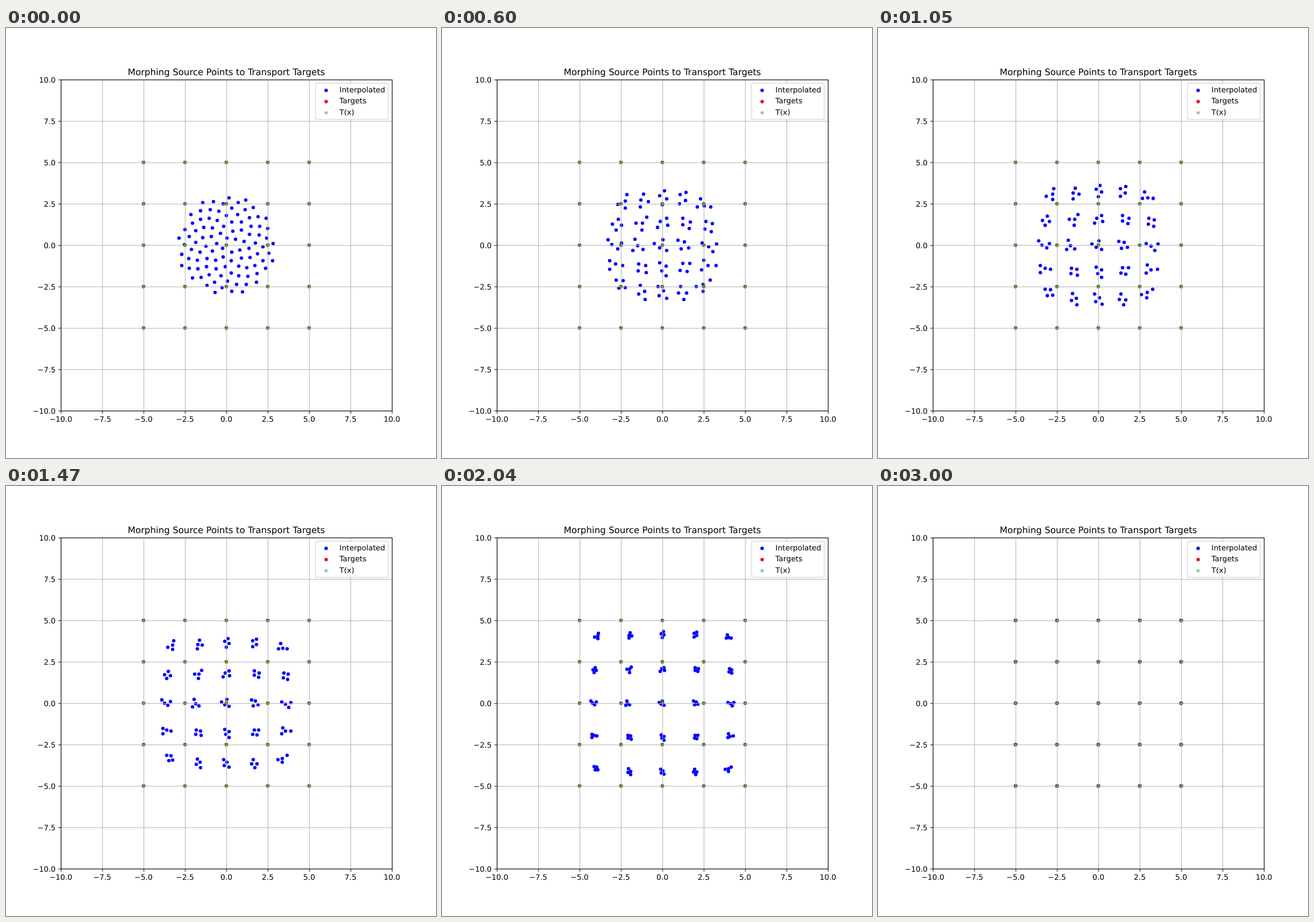
Recreate the animation shown at these times as an HTML page. Size 748 by 748 pixels, loop 3030 ms.

```html
<!DOCTYPE html>
<html lang="en">
<head>
<meta charset="utf-8">
<title>Morphing Source Points to Transport Targets</title>
<style>
  html, body { margin: 0; width: 100%; height: 100%; overflow: hidden; background: #fff; }
  svg { display: block; width: 100vw; height: 100vh; }
  text { font: 13.889px "DejaVu Sans", Verdana, sans-serif; fill: #000; text-rendering: geometricPrecision; }
  .title { font-size: 16.667px; }
  .dot { stroke-width: 2.083; }
  .grid { stroke: #b0b0b0; stroke-width: 1.11; }
  .axis { stroke: #000; stroke-width: 1.11; fill: none; }
  .mid { text-anchor: middle; }
  .end { text-anchor: end; }
</style>
</head>
<body>
<svg id="stage" viewBox="0 0 800 800"></svg>
<script>
const FRAME_MS = 30, STEPS = 100, COUNT = 100, PER_TARGET = 4;
const LEFT = 102, TOP = 96, SIZE = 616, UNIT = SIZE / 20, CELL = SIZE / 8;
const stage = document.getElementById('stage');

function add(parent, tag, attrs, content) {
  const el = document.createElementNS('http://www.w3.org/2000/svg', tag);
  for (const key in attrs) el.setAttribute(key, attrs[key]);
  if (content) el.textContent = content;
  return parent.appendChild(el);
}
const group = () => add(stage, 'g', {});
const label = (x, y, content, cls = '') => add(stage, 'text', { x, y, class: cls }, content);
const line = (parent, x1, y1, x2, y2, cls) => add(parent, 'line', { x1, y1, x2, y2, class: cls });
const dot = (parent, color, opacity = 1) => add(parent, 'circle', {
  class: 'dot', r: 2.196, fill: color, stroke: color,
  'fill-opacity': opacity, 'stroke-opacity': opacity
});

// Markers sit on whole plot units, like a raster plotter places them.
function place(el, x, y) {
  el.setAttribute('cx', Math.floor(LEFT + (x + 10) * UNIT + 0.5));
  el.setAttribute('cy', Math.floor(TOP + (10 - y) * UNIT + 0.5));
}

// Sunflower spiral filling a disk of radius 3.
const sources = Array.from({ length: COUNT }, (_, k) => {
  const radius = 3 * Math.sqrt((k + 1) / COUNT);
  const angle = (k + 1) * Math.PI * (1 + Math.sqrt(5));
  return [radius * Math.cos(angle), radius * Math.sin(angle)];
});
const targets = Array.from({ length: 25 }, (_, k) => [(k % 5 - 2) * 2.5, (2 - Math.floor(k / 5)) * 2.5]);
const slots = Array.from({ length: COUNT }, (_, k) => targets[Math.floor(k / PER_TARGET)]);

// Hungarian method: the cheapest one-to-one matching, as column per row.
function assign(n, cost) {
  const u = new Float64Array(n + 1), v = new Float64Array(n + 1);
  const rowOf = new Int32Array(n + 1), way = new Int32Array(n + 1);
  for (let i = 1; i <= n; i++) {
    const best = new Float64Array(n + 1).fill(Infinity), used = new Uint8Array(n + 1);
    let col = 0;
    rowOf[0] = i;
    do {
      used[col] = 1;
      const row = rowOf[col];
      let delta = Infinity, next = 0;
      for (let j = 1; j <= n; j++) {
        if (used[j]) continue;
        const slack = cost(row - 1, j - 1) - u[row] - v[j];
        if (slack < best[j]) { best[j] = slack; way[j] = col; }
        if (best[j] < delta) { delta = best[j]; next = j; }
      }
      for (let j = 0; j <= n; j++) {
        if (used[j]) { u[rowOf[j]] += delta; v[j] -= delta; }
        else best[j] -= delta;
      }
      col = next;
    } while (rowOf[col]);
    while (col) {
      rowOf[col] = rowOf[way[col]];
      col = way[col];
    }
  }
  const result = [];
  for (let j = 1; j <= n; j++) result[rowOf[j] - 1] = j - 1;
  return result;
}
const distance2 = (a, b) => (a[0] - b[0]) ** 2 + (a[1] - b[1]) ** 2;
const goals = assign(COUNT, (i, j) => distance2(sources[i], slots[j])).map(j => slots[j]);

// Points
const moving = group(), fixed = group();
const dots = sources.map(() => dot(moving, '#00f'));
for (const [x, y] of targets) place(dot(fixed, '#f00'), x, y);
for (const [x, y] of slots) place(dot(fixed, '#008000', 0.3), x, y);

// Grid, ticks and frame
const grid = group(), axes = group();
const start = LEFT + 0.5, top0 = TOP + 0.5, right = start + SIZE, bottom = top0 + SIZE;
for (let k = 0; k <= 8; k++) {
  const x = start + k * CELL, y = top0 + k * CELL;
  const name = value => value.toFixed(1).replace('-', '\u2212');
  line(grid, x, top0, x, bottom, 'grid');
  line(grid, start, y, right, y, 'grid');
  line(axes, x, bottom, x, bottom + 4.86, 'axis');
  line(axes, start - 4.86, y, start, y, 'axis');
  label(x - 0.5, 732.5, name(k * 2.5 - 10), 'mid');
  label(92.3, y + 4.8, name(10 - k * 2.5), 'end');
}
add(axes, 'rect', { x: start, y: top0, width: SIZE, height: SIZE, class: 'axis' });
label(410, 87.7, 'Morphing Source Points to Transport Targets', 'title mid');

// Legend
add(stage, 'rect', {
  x: 576, y: 103, width: 135, height: 67, rx: 2.78,
  fill: '#fff', 'fill-opacity': 0.8, stroke: '#ccc', 'stroke-opacity': 0.8, 'stroke-width': 1.39
});
[['Interpolated', '#00f', 1], ['Targets', '#f00', 1], ['T(x)', '#008000', 0.3]].forEach(([name, color, opacity], k) => {
  const baseline = 119.6 + k * 20.9;
  const marker = dot(stage, color, opacity);
  marker.setAttribute('cx', 595.6);
  marker.setAttribute('cy', baseline - 3.6);
  label(620.4, baseline, name);
});

function render(ms) {
  const t = Math.floor(ms / FRAME_MS) % (STEPS + 1) / STEPS;
  dots.forEach((el, k) => {
    const [x, y] = sources[k], [gx, gy] = goals[k];
    place(el, x + (gx - x) * t, y + (gy - y) * t);
  });
}

const began = performance.now();
function tick() {
  render(performance.now() - began);
  requestAnimationFrame(tick);
}
tick();
</script>
</body>
</html>
```
